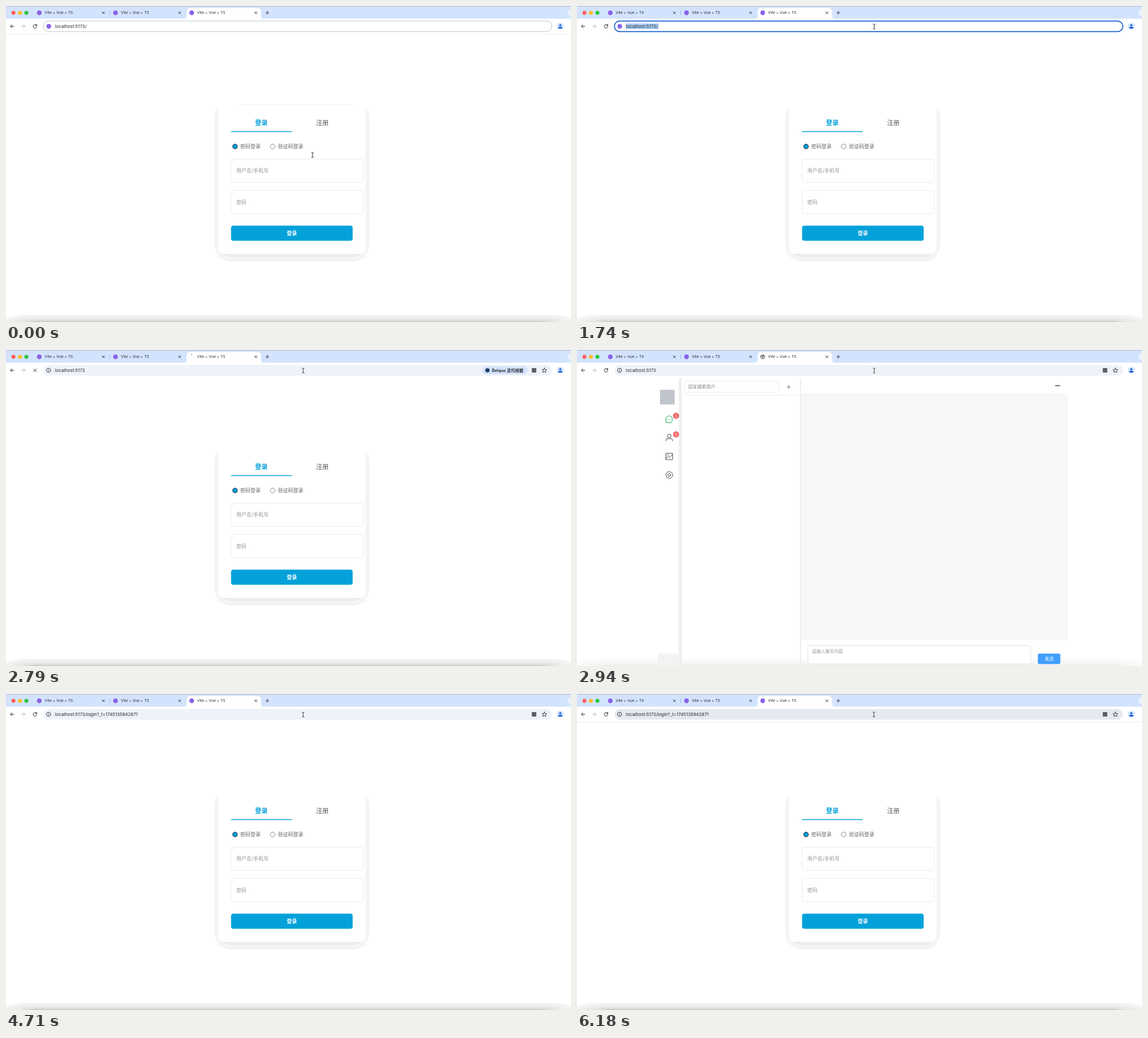
Animation, 1001 px wide and 560 px high, one loop 6210 ms. Source, as an HTML page:

```html
<!DOCTYPE html>
<html lang="zh-CN">
<head>
<meta charset="utf-8">
<title>Login redirect</title>
<style>
  html, body { margin: 0; width: 100%; height: 100%; overflow: hidden; background: #fff; }
  svg { display: block; width: 100%; height: 100%; }
  text { font-family: Inter, "Noto Sans CJK SC", "Noto Sans CJK", sans-serif; }
  .line { fill: none; stroke-linecap: round; stroke-linejoin: round; }
</style>
</head>
<body>
<svg id="stage" viewBox="0 0 1001 560"></svg>
<script>
const LOOP = 6210;
const BLUE = '#02a1d9', INK = '#272a2e', BRAND = '#8a63e8';
const stage = document.getElementById('stage');

// Shape helpers; text is centred vertically on y.
const rect = (x, y, w, h, fill, r = 0, extra = '') =>
  `<rect x="${x}" y="${y}" width="${w}" height="${h}" rx="${r}" fill="${fill}" ${extra}/>`;
const box = (x, y, w, h, stroke, r, width = 1, fill = '#fff') =>
  rect(x, y, w, h, fill, r, `stroke="${stroke}" stroke-width="${width}"`);
const disc = (x, y, r, fill, extra = '') =>
  `<circle cx="${x}" cy="${y}" r="${r}" fill="${fill}" ${extra}/>`;
const line = (d, stroke = INK, width = 1) =>
  `<path class="line" d="${d}" stroke="${stroke}" stroke-width="${width}"/>`;
const text = (x, y, size, str, fill = INK, extra = '') =>
  `<text x="${x}" y="${y + size * 0.365}" font-size="${size}" fill="${fill}" ${extra}>${str}</text>`;
const group = (id, body) => `<g id="${id}">${body}</g>`;
const cross = (x, y, r, width) =>
  line(`M${x - r} ${y - r}l${2 * r} ${2 * r}m0 ${-2 * r}l${-2 * r} ${2 * r}`, INK, width);
const plus = (x, y, r, stroke) => line(`M${x - r} ${y}h${2 * r}M${x} ${y - r}v${2 * r}`, stroke, 0.9);

function tab(x) {
  return text(x + 9.5, 11.7, 6.75, 'Vite + Vue + TS') + cross(x + 113.6, 12, 1.9, 1);
}

function tabStrip() {
  return rect(0, 0, 1001, 23, '#d3e3fd') + rect(0, 0, 1001, 0.8, '#a4b0c6') +
    disc(1002, 11.5, 7, '#e9f1fe') +
    '<path d="M314 23q6 0 6-6v-7q0-6.5 6.5-6.5h119q6.5 0 6.5 6.5v7q0 6 6 6z" fill="#fff"/>' +
    disc(13.2, 12, 3.6, '#fe5f57') + disc(24.7, 12, 3.6, '#febc2e') + disc(36.1, 12, 3.6, '#28c840') +
    [59, 194, 329].map(tab).join('') +
    disc(59, 12, 4.2, BRAND) + disc(194, 12, 4.2, BRAND) +
    line('M183.7 8v8', '#9fb9e4', 0.9) + plus(463, 12, 2.8, INK) +
    group('favicon', disc(329, 12, 4.2, BRAND)) +
    group('spinner', line('M329 8l-.6.1', INK, 1.2)) +
    group('globe', disc(329, 12, 3.6, 'none', 'stroke="#4d5156" stroke-width="1"') +
      line('M326 11l2.4.8.6 2.4M329.6 8.8l-.4 1.8 2.8 1', '#4d5156', 1.3));
}

function toolbar() {
  const reload = line('M54 34.2a3.2 3.2 0 1 0 .6 2.4M54.5 32.2v2.5h-2.4', INK, 1);
  const info = disc(75.5, 36, 3.7, 'none', `stroke="${INK}" stroke-width=".9"`) +
    line('M75.5 35.8v1.9M75.5 34.1v.1', INK, 0.9);
  const chip = rect(844, 29, 80, 14, '#d3e3fd', 7) + disc(853, 36, 3.8, '#1f3d68') +
    text(861, 36, 7.3, 'Belquo 灵巧视窗', '#1f1f1f', 'font-weight="600"');
  const actions = rect(931.5, 32, 8, 8, '#5c5f63', 1) +
    line('M953.8 31.8l1.2 2.7 3 .3-2.2 2 .6 2.9-2.6-1.5-2.6 1.5.6-2.9-2.2-2 3-.3z', INK, 0.9);
  return rect(0, 22.5, 1001, 27, '#fff') +
    group('divider', rect(0, 49, 1001, 0.8, '#e8e9ec')) +
    line('M14 36h-6.2m2.8-2.8L7.8 36l2.8 2.8', INK, 1) +
    line('M27.5 36h6.2m-2.8-2.8l2.8 2.8-2.8 2.8', '#b1b3b6', 1) +
    group('reload', reload) + group('stop', cross(51.5, 36, 2.5, 1)) +
    '<rect id="omnibox" x="66.3" y="26.6" width="900.8" height="18.8" rx="9.4"/>' +
    group('selection', rect(86.5, 31, 58, 10, '#a9cdf5')) +
    group('siteLogo', disc(75.8, 36, 4.2, BRAND)) +
    group('info', info) + group('chip', chip) + group('actions', actions) +
    `<text id="url" x="86.8" y="38.8" font-size="7.9" fill="${INK}"></text>` +
    disc(982, 36, 6.2, '#d3e3fd') + disc(982, 34, 1.8, '#0b57d0') +
    '<path d="M978.4 39.7v-.8q0-2.2 3.6-2.2t3.6 2.2v.8z" fill="#0b57d0"/>';
}

function loginPage() {
  const shadow = '<path d="M376 181q-7 6-7 20v216q0 36 33 36h209q33 0 33-36V201q0-14-7-20z" fill="#f4f4f4"/>' +
    '<path d="M381 437q6 8 22 8h207q16 0 22-8z" fill="#ececec"/>';
  const field = (y, label) => box(398.8, y, 234.2, 41.1, '#ebebed', 4) + text(408, y + 20.5, 9, label, '#929497');
  return shadow + rect(376, 170, 261, 269, '#fff', 8) +
    group('topEdge', rect(407, 174, 208, 0.8, '#eeeeee')) +
    text(441.3, 206.5, 11.1, '登录', BLUE, 'font-weight="600"') +
    text(549.3, 206.5, 11.1, '注册', '#555', 'font-weight="500"') +
    rect(398.6, 221.8, 107.8, 1.5, BLUE) +
    disc(405.8, 249, 4.1, BLUE, 'stroke="#2c3f55" stroke-width="1.3"') +
    text(415, 248.7, 9, '密码登录', '#626467') +
    disc(472.4, 249, 4.2, '#fff', 'stroke="#777" stroke-width=".9"') +
    text(481.8, 248.7, 9, '验证码登录', '#626467') +
    field(271.5, '用户名/手机号') + field(327, '密码') +
    rect(398.8, 389.3, 215.4, 26.7, BLUE, 4) +
    text(506.5, 402.8, 9, '登录', '#fff', 'font-weight="600" text-anchor="middle"');
}

function chatPage() {
  const badge = (y, n) => disc(175.5, y, 5.4, '#f16767') + text(175.5, y, 6.5, n, '#fff', 'text-anchor="middle"');
  const gearPoint = i => {
    const a = (i + 0.5) * Math.PI / 12, r = i % 4 < 2 ? 6.3 : 5.5;
    return `${(163.5 + r * Math.sin(a)).toFixed(1)} ${(221.5 + r * Math.cos(a)).toFixed(1)}`;
  };
  const gear = 'M' + Array.from({ length: 24 }, (_, i) => gearPoint(i)).join('L') + 'Z';
  const icons =
    line('M157.8 128.9l.6-2.6a6 6 0 1 1 2.4 2z', '#2fb760', 1.1) +
    [160.8, 163.6, 166.4].map(x => disc(x, 123.2, 0.7, '#2fb760')).join('') +
    disc(163.5, 152.3, 3.2, 'none', 'stroke="#444" stroke-width="1"') +
    line('M157.8 161v-1q0-3 3-3h5.4q3 0 3 3v1', '#444', 1) +
    line('M157.8 183h11.5v11.3h-11.5zM158 192l3.6-3.7 2.4 2.2 5-5.2', '#444', 1) +
    disc(161, 186, 0.9, '#444') +
    line(gear, '#444', 1) + disc(163.5, 221.5, 2.3, 'none', 'stroke="#444" stroke-width="1"');
  return rect(143, 538, 37, 22, '#f3f3f3') + rect(180, 50, 5, 510, '#f0f0f1') +
    rect(184, 50, 1.2, 510, '#e6e6e8') + rect(395, 50, 2, 510, '#eeeeef') +
    rect(147, 70.4, 26, 26, '#c0c4cc', 1.5) +
    icons + badge(116.5, 3) + badge(149.5, 0) +
    box(190.5, 54.8, 166.5, 20, '#e8eaee', 2.5) + text(197, 64.7, 8, '回车搜索用户', '#7c7e82') +
    plus(375.2, 65.5, 2.8, '#606266') + rect(185, 79.7, 211, 0.8, '#e7e7e9') +
    rect(397, 77, 472, 437, '#f6f7f9') +
    [848.8, 851.7, 854.6].map(x => disc(x, 63.2, 1.1, '#222')).join('') +
    box(409, 523.3, 395, 33, '#dfe2e7', 4) + text(416, 533.8, 7.9, '请输入聊天内容', '#95979c') +
    rect(816.5, 538, 39.8, 18.6, '#409eff', 3) +
    text(836.4, 547.3, 8, '发送', '#fff', 'font-weight="500" text-anchor="middle"');
}

// Soft rim at the foot of the window, built from nested bands.
function bottomRim() {
  const tones = ['#f4f4f4', '#f0f0f0', '#eaeaea', '#e0e0e0', '#cdcdcd'];
  return tones.map((tone, i) =>
    `<rect x="${-6 + i * 7}" y="${547.6 + i * 2.6}" width="${1013 - i * 14}" height="40" rx="38" ry="13" fill="${tone}"/>`
  ).join('');
}

const beam = 'M-1.8-4.2q1.4 0 1.8.8q.4-.8 1.8-.8M0-3.4V3.6M-1.8 4.4q1.4 0 1.8-.8q.4.8 1.8.8';
stage.innerHTML = rect(0, 0, 1001, 560, '#fff') + tabStrip() + toolbar() +
  group('rim', bottomRim()) + group('login', loginPage()) + group('chat', chatPage()) +
  group('beam', line(beam, '#fff', 2) + line(beam, '#222', 0.95)) +
  group('arrow', '<path d="M0 0V8l1.9-1.7 1.3 3 1.4-.6-1.3-2.9h2.5z" fill="#111" stroke="#fff" stroke-width=".6"/>');

const el = {};
stage.querySelectorAll('[id]').forEach(node => { el[node.id] = node; });
const show = (id, on) => { el[id].style.display = on ? '' : 'none'; };

// Pointer stops: time, x, y
const path = [
  [0, 543, 264], [420, 543, 264], [510, 541, 168], [660, 541, 168],
  [810, 536.5, 44.5], [960, 530, 38], [1200, 526.5, 36.4], [4680, 526.5, 36.4],
  [4740, 526.2, 36.6], [4830, 526.5, 36.4], [5250, 526.5, 36.4], [5280, 526, 36.2], [LOOP, 526, 36.2]
];

function pointerAt(t) {
  const i = Math.max(1, path.findIndex(p => p[0] > t));
  const [t0, x0, y0] = path[i - 1], [t1, x1, y1] = path[i];
  const k = (t - t0) / (t1 - t0);
  return [x0 + (x1 - x0) * k, y0 + (y1 - y0) * k];
}

function render(time) {
  const t = Math.floor((time % LOOP) / 30) * 30;
  const focused = t >= 1200 && t < 2640;
  const visited = t >= 2640;
  const loading = visited && t < 2910;
  const chat = t >= 2910 && t < 2970;
  const crisp = t < 450 || t >= 6180;

  show('favicon', !loading && !chat);
  show('spinner', loading);
  show('globe', chat);
  show('divider', crisp);
  show('reload', !loading);
  show('stop', loading);
  show('selection', focused);
  show('siteLogo', !visited);
  show('info', visited);
  show('chip', loading);
  show('actions', visited);
  show('login', !chat);
  show('chat', chat);
  show('topEdge', t < 450);
  el.rim.setAttribute('opacity', chat ? 0.35 : 1);
  el.spinner.setAttribute('transform', `rotate(${(t - 2790) / 2} 329 12)`);

  el.omnibox.setAttribute('fill', !visited ? '#fff' : crisp ? '#e5e9f0' : '#eef2f9');
  el.omnibox.setAttribute('stroke', visited ? 'none' : focused ? '#1660cf' : '#c3c5c9');
  el.omnibox.setAttribute('stroke-width', focused ? 1.7 : 1);
  el.url.textContent = 'localhost:5173' + (!visited ? '/' : t < 2970 ? '' : '/login?_t=1745135942871');

  const [x, y] = pointerAt(t);
  const overText = y < 44 || (y > 184 && t < 510);
  show('beam', overText);
  show('arrow', !overText);
  el[overText ? 'beam' : 'arrow'].setAttribute('transform', `translate(${x} ${y})`);
}

const start = performance.now();
function tick() {
  render(performance.now() - start);
  requestAnimationFrame(tick);
}
tick();
</script>
</body>
</html>
```
